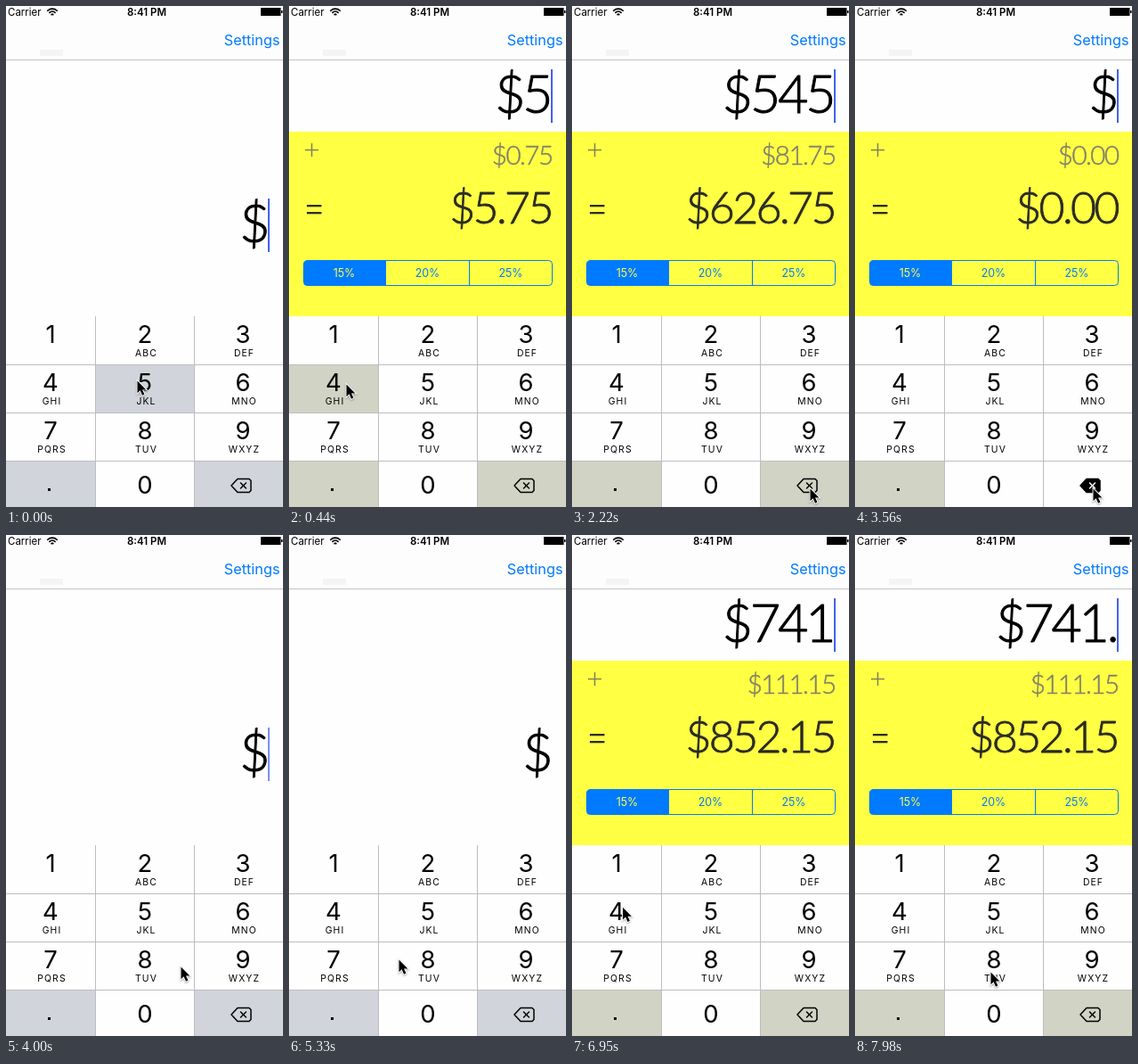
These frames come from a looping animation (311x562 px, 8 s). An HTML page with a canvas:

```html
<!DOCTYPE html>
<html lang="en">
<head>
<meta charset="utf-8">
<title>Tip calculator</title>
<style>
html, body { margin: 0; width: 100%; height: 100%; overflow: hidden; background: #fff; }
canvas { display: block; width: 311px; height: 562px; }
</style>
</head>
<body>
<canvas id="stage"></canvas>
<script>
const W = 311, H = 562, LOOP = 8000, TICK = 147.9;
const BLUE = '#007aff', YELLOW = '#ffff43', LINE = '#bcbdbf';
const UI = 'Inter, Roboto, sans-serif', LIGHT = 'Lato, "Open Sans", sans-serif';
const KEYBOARD_TOP = 348, ROW = 54, COLS = [0, 101, 212, 311], CENTERS = [50, 156, 266];
const KEYS = [...'123456789.0', 'del'];
const LETTERS = ['', 'ABC', 'DEF', 'GHI', 'JKL', 'MNO', 'PQRS', 'TUV', 'WXYZ'];

// What the hand does: tick, key pressed (if any) and pointer position.
const STOPS = [
  [0, '5', 147, 420], [3, '4', 64, 424], [7, '5', 163, 428], [16, '', 267, 541],
  [18, 'del', 267, 541], [21, 'del', 267, 541], [24, 'del', 267, 541],
  [28, '', 196, 484], [37, '', 123, 476], [39, '7', 57, 479],
  [42, '4', 70, 433], [46, '1', 58, 377], [51, '.', 52, 538], [55, '', 152, 490]
].map(([at, key, x, y]) => ({ at, key, x, y }));

const canvas = document.getElementById('stage');
const dpr = window.devicePixelRatio || 1;
canvas.width = W * dpr;
canvas.height = H * dpr;
const c = canvas.getContext('2d');
c.scale(dpr, dpr);

const clamp = v => Math.max(0, Math.min(1, v));
const smooth = t => t * t * (3 - 2 * t);

// Deleting acts when the key goes down, typing when it comes up.
function stateAt(n) {
  let bill = '', pressed = '', edited = -1, flipped = -9;
  for (const { at, key } of STOPS) {
    if (key && at === n) pressed = key;
    const acts = key === 'del' ? at : at + 1;
    if (!key || acts > n) continue;
    const next = key === 'del' ? bill.slice(0, -1) : bill + key;
    if (!next !== !bill) flipped = acts;
    bill = next;
    edited = acts;
  }
  const age = n - flipped;
  const open = bill ? smooth(clamp((age + 1) / 2)) : 1 - smooth(clamp(age / 3));
  const blink = (n - edited) % 6.76;
  return { bill, pressed, open, caret: clamp(3.7 - blink) + clamp(blink - 5.8) };
}

// The pointer arrives one tick before each stop.
function pointerAt(n) {
  const i = STOPS.findIndex(s => s.at > n);
  const a = STOPS[i - 1], b = STOPS[i];
  const depart = Math.max(a.at, b.at - 6);
  const t = clamp((n - depart) / (b.at - 1 - depart));
  return [a.x + (b.x - a.x) * t, a.y + (b.y - a.y) * t];
}

function text(str, x, y, font, color = '#000', align = 'center', spacing = 0) {
  c.font = font;
  c.fillStyle = color;
  c.textAlign = align;
  c.letterSpacing = spacing + 'px';
  c.fillText(str, x, y);
}

// Light digits set tightly, right-aligned and slightly emboldened.
function money(value, right, y, size, color) {
  const spacing = -size * .052;
  text('$' + value, right + spacing, y, `300 ${size}px ${LIGHT}`, color, 'right', spacing);
  c.strokeStyle = color;
  c.lineWidth = size * .017;
  c.strokeText('$' + value, right + spacing, y);
}

function box(x, y, w, h, color) {
  c.fillStyle = color;
  c.fillRect(x, y, w, h);
}

function path(points, close) {
  c.beginPath();
  points.forEach(([x, y]) => c.lineTo(x, y));
  if (close) c.closePath();
}

function drawHeader() {
  box(0, 0, W, 60, '#fdfdfd');
  box(38, 49, 26, 7, '#f4f4f4');
  box(0, 60, W, 1, '#c4c4c4');
  text('Carrier', 2, 10.5, '11.5px ' + UI, '#000', 'left');
  text('8:41 PM', 158, 10.5, '600 11.5px ' + UI);
  text('Settings', 307.5, 44, '16.3px ' + UI, BLUE, 'right');

  c.strokeStyle = '#000';
  c.lineWidth = 1.7;
  for (const r of [1.2, 4.3, 7.4]) {
    c.beginPath();
    c.arc(52, 10.5, r, -Math.PI * .75, -Math.PI * .25);
    c.stroke();
  }
  box(286, 2, 22.5, 9, '#000');
  box(309, 5, 1.5, 3, '#000');
}

function drawPanel(open, bill) {
  const tip = bill * .15;
  c.save();
  c.globalAlpha = open;
  c.translate(0, 145 * (1 - open));
  box(0, 141, W, H - 141, YELLOW);

  box(18, 160.8, 15, 1.5, '#808060');
  box(24.8, 154, 1.5, 15, '#808060');
  money(tip.toFixed(2), 297, 178, 29.5, '#80806a');
  for (const y of [223, 231]) box(20, y, 16.5, 2.3, '#2b2b26');
  money((bill + tip).toFixed(2), 297.5, 244, 50, '#2b2b26');

  c.save();
  c.beginPath();
  c.roundRect(16.5, 285.5, 279, 28, 4);
  c.strokeStyle = BLUE;
  c.lineWidth = 1;
  c.stroke();
  c.clip();
  box(16, 285, 93, 29, BLUE);
  box(202, 285, 1, 29, BLUE);
  c.restore();
  ['15%', '20%', '25%'].forEach((label, i) =>
    text(label, 62 + i * 93.5, 304, '12.4px ' + UI, i ? BLUE : YELLOW));
  c.restore();
}

function drawBill(open, bill, caret) {
  c.save();
  c.translate(0, -145 * open);
  money(bill, 296.5, 264.5, 59, '#000');
  c.globalAlpha = caret;
  box(294, 216, 2, 60, '#4262ec');
  c.restore();
}

function drawDelete(pressed) {
  c.lineJoin = c.lineCap = 'round';
  c.lineWidth = 1.5;
  c.strokeStyle = c.fillStyle = '#000';
  path([[253, 538], [260, 530.5], [273, 530.5], [275, 532.5], [275, 543.5], [273, 545.5], [260, 545.5]], true);
  c.stroke();
  if (pressed) c.fill();
  c.strokeStyle = pressed ? '#fff' : '#000';
  for (const s of [-1, 1]) {
    path([[263.5, 538 - 3 * s], [269.5, 538 + 3 * s]]);
    c.stroke();
  }
}

function drawKeyboard(open, pressed) {
  const gray = `rgb(209,212,${Math.round(218 - 22 * open)})`;
  box(0, KEYBOARD_TOP, W, H - KEYBOARD_TOP, '#fefefe');
  KEYS.forEach((key, i) => {
    const col = i % 3, x = CENTERS[col], y = KEYBOARD_TOP + Math.floor(i / 3) * ROW;
    const special = key === '.' || key === 'del';
    if (special !== (key === pressed)) box(COLS[col], y, COLS[col + 1] - COLS[col], ROW, gray);
    if (special) return;
    text(key, x, y + (key === '0' ? 37 : 30), '27.5px ' + UI);
    text(LETTERS[i] || '', x + 1.5, y + 45, '10.4px ' + UI, '#000', 'center', 1.1);
  });
  for (let row = 1; row < 4; row++) box(0, KEYBOARD_TOP + row * ROW, W, 1, LINE);
  for (const x of [100, 211]) box(x, KEYBOARD_TOP, 1, H - KEYBOARD_TOP, LINE);
  box(47, 541, 3, 3, '#000');
  drawDelete(pressed === 'del');
}

function drawPointer([x, y]) {
  c.save();
  c.translate(x + .5, y + .5);
  c.scale(.92, .92);
  path([[0, 0], [0, 15], [3.4, 11.8], [6, 17.6], [8.6, 16.4], [6, 10.8], [10.8, 10.8]], true);
  c.shadowColor = 'rgba(0,0,0,.35)';
  c.shadowBlur = 2 * dpr;
  c.shadowOffsetY = dpr;
  c.lineJoin = 'miter';
  c.lineWidth = 2;
  c.strokeStyle = '#fff';
  c.stroke();
  c.shadowColor = 'transparent';
  c.fillStyle = '#000';
  c.fill();
  c.restore();
}

function draw(ms) {
  const n = Math.floor((ms % LOOP + 8) / TICK);
  const { bill, pressed, open, caret } = stateAt(n);
  box(0, 0, W, H, '#fefefe');
  if (open > 0) drawPanel(open, Number(bill));
  drawBill(open, bill, caret);
  drawHeader();
  drawKeyboard(open, pressed);
  drawPointer(pointerAt(n));
}

const start = performance.now();
function loop() {
  draw(performance.now() - start);
  requestAnimationFrame(loop);
}
loop();
</script>
</body>
</html>
```
